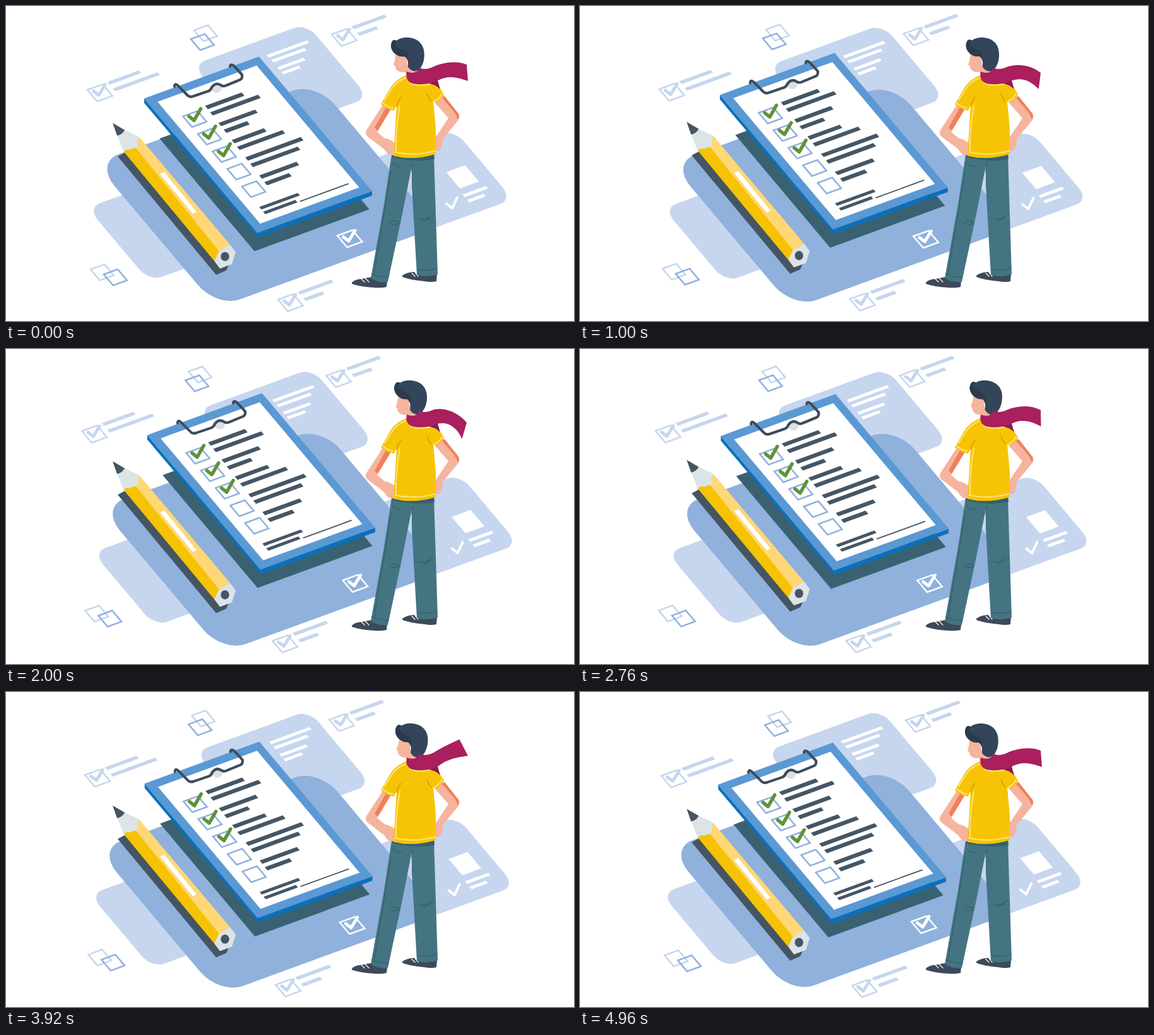
An HTML page for the animation above (5000 ms loop, 900x500 px).

```html
<!DOCTYPE html>
<html lang="en">
<head>
<meta charset="utf-8">
<title>Checklist</title>
<style>
html, body { margin: 0; width: 100%; height: 100%; overflow: hidden; background: #fff; }
svg { display: block; width: 900px; height: 500px; }
.iso { transform: matrix(1, -.366, .84, 1, 0, 0); }
.line { fill: none; stroke-linecap: round; stroke-linejoin: round; }
.box { fill: none; vector-effect: non-scaling-stroke; }
</style>
</head>
<body>
<svg viewBox="0 0 900 500">
  <g id="panels"></g>
  <g id="icons"></g>
  <g id="board"></g>
  <g id="pencil">
    <path fill="#455562" d="M177 239L190 232L335 404L353 411L349 420L333 427Z"/>
    <path fill="#dce4e8" d="M188 197L211 208L213 232L187 233L176 205Z"/>
    <path fill="#455562" d="M169 186L188 197Q185 204 176 206Z"/>
    <path fill="#f5c303" d="M187 232Q191 226 197 229Q202 224 209 227L341 387L330 405Z"/>
    <path fill="#ffd776" d="M211 208L355 379L338 390L207 227Q210 220 208 217Z"/>
    <path fill="#fff" d="M244 267L251 264L302 327L296 330Z"/>
    <path fill="#dce4e8" d="M337 390L355 379L364 391L358 410L339 417L330 405Z"/>
    <ellipse fill="#455562" cx="347" cy="398" rx="6.7" ry="7.3"/>
  </g>
  <g id="person">
    <g fill="#3e495a">
      <path d="M548 439Q552 434 564 433L580 430Q594 437 604 437L603 446Q594 448 584 447Q562 446 548 441Z"/>
      <path d="M628 428Q634 423 646 422L652 426Q668 431 683 425L682 437Q674 439 664 437Q640 435 628 430Z"/>
    </g>
    <path class="line" stroke="#fff" stroke-width="1.3" d="M563 433l5 5M569 432l6 6M643 424l5 5M649 424l4 5"/>
    <path fill="#447482" d="M611 236Q645 245 678 234L680 300L684 426Q668 432 651 427L643 285L643 254L628 330L605 438Q590 440 578 432L599 315Z"/>
    <path fill="#33606c" d="M612 236Q645 245 678 233L679 243Q650 249 612 240Z"/>
    <path class="line" stroke="#33606c" stroke-width="1.3" d="M610 262L583 427M613 249Q620 257 628 254M580 425Q592 431 606 430M652 418Q668 422 683 416M608 344Q616 350 624 344M612 341L622 342M655 338Q668 340 676 331M661 342L672 336M644 250L643 262"/>
    <g fill="#f5b49d">
      <path d="M597 157L571 197Q568 204 574 208L599 227Q605 238 613 237L617 236L618 219Q609 211 600 210L588 200L609 165Z"/>
      <path d="M680 154L693 142L717 171Q720 177 716 182L692 211Q692 224 686 230L679 231L681 208L701 178Z"/>
    </g>
    <path fill="#f27f59" d="M602 161L609 165L589 198L584 193ZM691 146L695 143L717 171Q719 176 716 180Q714 173 709 167Z"/>
    <path fill="#f6c404" d="M636 109Q616 117 609 130L594 156Q603 164 615 166L619 157L614 238Q646 246 681 235L681 195L677 151L681 154Q690 148 694 140L684 125Q672 113 660 110Z"/>
    <path class="line" stroke="#ffe27b" stroke-width="2" d="M633 114Q618 120 611 132L600 149M596 153Q603 160 613 162M624 158Q617 195 618 231M616 232Q648 239 680 230M679 151Q687 147 691 139M640 122Q656 129 674 123"/>
    <path class="line" stroke="#dd9309" stroke-width="1.5" d="M626 145Q621 150 619 159M667 139Q670 147 674 151"/>
    <g id="head">
      <path fill="#f5b49d" d="M617 76L632 79Q637 80 635 88L638 98L651 102L653 113L634 113L633 105Q625 106 621 103Q617 101 617 96L614 93Q617 86 617 76Z"/>
      <path fill="#34455b" d="M631 80Q624 81 620 78C612 74 608 65 611 58Q613 52 619 55C627 48 646 48 655 57C664 65 664 80 661 90Q657 101 651 103Q643 105 637 97L637 89Q636 82 631 80Z"/>
      <path fill="#2c3a4e" d="M631 80Q624 81 620 78C612 74 608 65 611 58Q613 52 619 55Q614 58 617 62Q623 69 634 72Q638 77 637 89Q636 82 631 80Z"/>
    </g>
    <path fill="#8d1a51" d="M668 116L683 115L688 132Q680 124 666 122Z"/>
    <path id="scarf" fill="#aa1f5e"/>
  </g>
</svg>
<script>
const LIGHT = '#c6d6ee', MID = '#8fb1dc', INK = '#455665';
const $ = id => document.getElementById(id);

const iso = content => `<g class="iso">${content}</g>`;
const rect = (x, y, w, h, fill, r = 0) =>
  `<rect x="${x}" y="${y}" width="${w}" height="${h}" rx="${r}" fill="${fill}"/>`;
const box = (x, y, color, w = 24, h = 18.5) =>
  `<rect class="box" x="${x}" y="${y}" width="${w}" height="${h}" stroke="${color}" stroke-width="2.5"/>`;
const line = (d, color, width) =>
  `<path class="line" d="${d}" stroke="${color}" stroke-width="${width}"/>`;
const at = (x, y, content) => `<g transform="translate(${x} ${y})">${content}</g>`;

// A ticked box, optionally followed by two bars of the given lengths
const ticked = (x, y, color, bars = []) => at(x, y,
  iso(box(0, 0, color) + bars.map((w, i) => rect(32, -.7 + 10.5 * i, w, 4.5, color)).join('')) +
  line('M9.5 2L18 8.5L28 -8', color, 5));
const squares = (x, y, x2, y2) =>
  at(x, y, iso(box(0, 0, LIGHT, 22, 17.5))) + at(x2, y2, iso(box(0, 0, MID, 22, 17.5)));

$('panels').innerHTML = iso(
  rect(166, 154.5, 180, 117.5, LIGHT, 19) +
  rect(-107, 281, 120, 117, LIGHT, 19) +
  rect(230, 348.5, 187, 111, LIGHT, 19) +
  rect(-52, 230, 350, 230, MID, 36) +
  [[175.2, 64], [183.2, 53], [194.7, 42], [202.2, 28]].map(([y, w]) => rect(266, y, w, 4, '#fff')).join('') +
  rect(364, 397, 30, 26, '#fff') + rect(361, 431.5, 37, 4, '#fff') + rect(361, 440, 26, 4, '#fff')
) + line('M698 314L707 321L715 304', '#fff', 4) + ticked(525, 364.5, '#fff');

$('icons').innerHTML =
  ticked(129, 133, LIGHT, [50, 71]) + ticked(516, 45, LIGHT, [52, 30]) + ticked(431, 466, LIGHT, [53, 30]) +
  squares(298, 38.5, 293, 52.5) + squares(134, 418, 155, 426);

const rows = [[212, 58], [222, 76], [238.7, 58], [249.2, 37], [265.3, 51],
  [275.8, 72], [292.4, 88], [302.5, 75], [320.5, 59], [330.8, 39]];
let board = iso(rect(51, 229, 182, 179, '#3a6171')) +
  '<path fill="#0a70bd" d="M219 147L399 360L580 294V301L399 367L219 154Z"/>' +
  iso(rect(73, 173.5, 182, 213.5, '#5b99d4') + rect(86, 183.5, 157, 193.5, '#fff') +
    rows.map(([y, w]) => rect(139.5 - .05 * (y - 212), y - 2.5, w, 5.2, INK)).join('') +
    rect(102, 356.3, 61, 4, INK) + rect(102, 363.7, 51, 4, INK) + rect(157, 366.9, 77, 1.5, INK));
for (let i = 0; i < 5; i++) {
  const y = 212.5 + 27.8 * i;
  board += iso(box(102, y, MID, 23, 17));
  if (i < 3) board += at(102 + .84 * y, y - 37.3, line('M9.5 0L17.5 6.5L28 -12', '#5f923a', 5.5));
}
$('board').innerHTML = board +
  '<circle cx="334" cy="130" r="8" fill="#dcdfe4"/>' +
  line('M267 128Q267 122 272 126L288 142Q291 145 296 143.5L321 135Q325 133 326 129Q333 120 341 126Q344 128 348 126.5L371 117Q375 115 374 109L361 95Q356 91 355 96', '#3f4b59', 4.2);

const LOOP = 5000;
const wave = (t, shift) => (1 - Math.cos(2 * Math.PI * (t - shift) / LOOP)) / 2;
const ease = (t, t0, t1, from, to) =>
  from + (to - from) * (1 - Math.cos(Math.PI * (t - t0) / (t1 - t0))) / 2;
const move = (id, x, y, extra = '') => $(id).setAttribute('transform', `translate(${x} ${y}) ${extra}`);

function scarfPath(w) {
  const up = Math.min(w, 0), down = Math.max(w, 0);
  return `M635 104Q650 110 655 98Q664 103 678 96C692 ${90 + .15 * w} 712 ${86 + .45 * w} ${730 + .65 * up} ${93 + w}` +
    `L${732 - .4 * down} ${119 + w}C715 ${113 + .5 * w} 700 ${109 + .2 * w} 683 119Q662 127 644 123Q632 119 635 104Z`;
}

function draw(now) {
  const t = now % LOOP;
  const drift = wave(t, 0), lift = wave(t, -375);
  move('panels', 9.6 * drift, 3 * drift);
  move('icons', -9.6 * drift, -3 * drift);
  move('board', 5.2 * lift - .3, .6 - 10.8 * lift);
  move('pencil', 0, -10 * wave(t, 280));

  const tilt = t < 3500 ? ease(t, 0, 3500, 0, 1) : ease(t, 3500, LOOP, 1, 0);
  move('head', 4 * tilt, tilt / 2, `rotate(${5.5 * tilt} 645 108)`);

  const sway = t < 1900 ? ease(t, 0, 1900, 0, 24)
    : t < 3700 ? ease(t, 1900, 3700, 24, -19) : ease(t, 3700, LOOP, -19, 0);
  $('scarf').setAttribute('d', scarfPath(sway));
  requestAnimationFrame(draw);
}
draw(performance.now());
</script>
</body>
</html>
```
